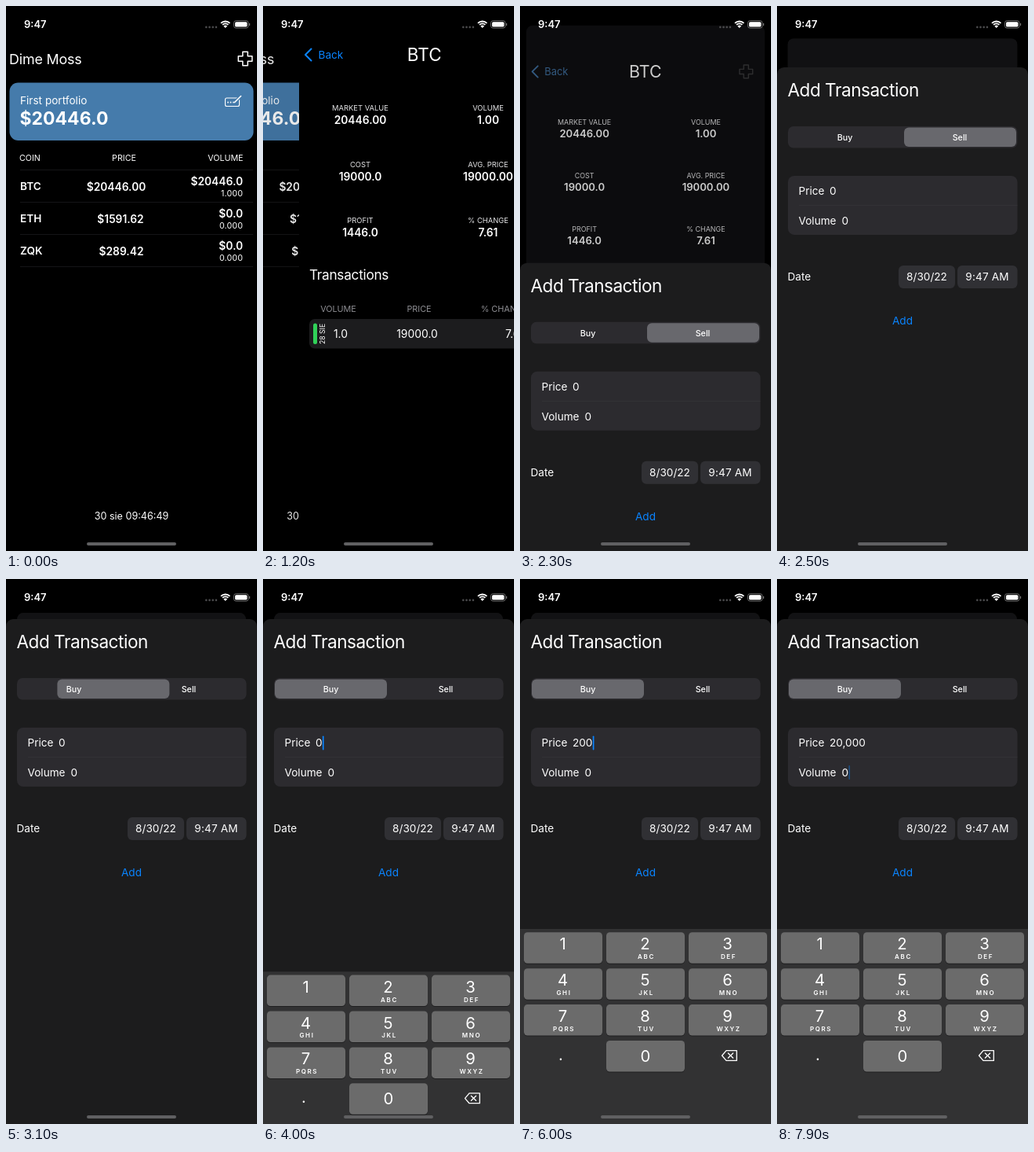
Write an HTML page with a canvas that moves like this. It is 320 by 693 pixels and loops after 8000 ms.

```html
<!DOCTYPE html>
<html lang="en">
<head>
<meta charset="utf-8">
<title>Portfolio</title>
<style>
  html, body { margin: 0; width: 100%; height: 100%; overflow: hidden; background: #000; }
  canvas { display: block; width: 320px; height: 693px; }
</style>
</head>
<body>
<canvas id="stage"></canvas>
<script>
const W = 320, H = 693, LOOP = 8000, STEP = 100;
const canvas = document.getElementById('stage');
const ctx = canvas.getContext('2d');
const dpr = window.devicePixelRatio || 1;
canvas.width = W * dpr;
canvas.height = H * dpr;

const BLUE = '#0a84ff', FIELD = '#2c2b2f', SHEET = '#1c1c1d';
const BODY = 13.6;

// Progress of a critically damped spring, from 0 to 1.
function spring(t, start) {
  const x = Math.max(0, t - start) / 1000 * 15.2;
  const p = 1 - (1 + x) * Math.exp(-x);
  return p > 0.998 ? 1 : p;
}

function box(x, y, w, h, r, fill) {
  ctx.beginPath();
  ctx.roundRect(x, y, w, h, r);
  ctx.fillStyle = fill;
  ctx.fill();
}

// Text with its capitals centred on y.
function text(s, x, y, size, { weight = 400, align = 'left', color = '#fff', track = 0 } = {}) {
  ctx.font = `${weight} ${size}px Inter, sans-serif`;
  ctx.letterSpacing = `${track * size}px`;
  ctx.textAlign = align;
  ctx.fillStyle = color;
  ctx.fillText(s, x, y + size * 0.364);
  return ctx.measureText(s).width;
}

const centered = (s, x, y, size, options) => text(s, x, y, size, { align: 'center', ...options });

function line(points, color, width, close = false) {
  ctx.beginPath();
  points.forEach(([x, y]) => ctx.lineTo(x, y));
  if (close) ctx.closePath();
  ctx.strokeStyle = color;
  ctx.lineWidth = width;
  ctx.lineJoin = ctx.lineCap = 'round';
  ctx.stroke();
}

function plusIcon(x, y, color) {
  const a = 3.2, b = 8.8;
  const arm = [[-a, -a], [-a, -b], [a, -b]];
  const points = [];
  for (let i = 0; i < 4; i++) {
    for (let [px, py] of arm) {
      for (let k = 0; k < i; k++) [px, py] = [-py, px];
      points.push([x + px, y + py]);
    }
  }
  line(points, color, 1.5, true);
}

function editIcon() {
  ctx.beginPath();
  ctx.roundRect(279.5, 117, 18, 10.5, 2);
  ctx.strokeStyle = '#fff';
  ctx.lineWidth = 1.1;
  ctx.stroke();
  line([[291, 123], [300, 114]], '#457bab', 4);
  line([[291.5, 122.5], [299.5, 114.5]], '#fff', 1.6);
  for (const x of [283, 286.5, 290]) box(x - 0.9, 121.6, 1.8, 1.8, 0.9, '#fff');
}

function statusBar() {
  text('9:47', 23, 23, 13, { weight: 600 });
  for (let i = 0; i < 4; i++) box(254 + i * 4.2, 25.6, 2.6, 2.6, 1.3, '#4a4a4c');
  ctx.strokeStyle = '#fff';
  ctx.lineCap = 'butt';
  ctx.lineWidth = 1.8;
  for (const r of [8.1, 5.2]) {
    ctx.beginPath();
    ctx.arc(279.7, 27.6, r, -Math.PI * 0.75, -Math.PI * 0.25);
    ctx.stroke();
  }
  ctx.beginPath();
  ctx.moveTo(279.7, 28);
  ctx.arc(279.7, 28, 3.4, -Math.PI * 0.75, -Math.PI * 0.25);
  ctx.fillStyle = '#fff';
  ctx.fill();
  ctx.beginPath();
  ctx.roundRect(290.5, 18.7, 18.4, 9.4, 2.8);
  ctx.strokeStyle = '#777';
  ctx.lineWidth = 0.9;
  ctx.stroke();
  box(292, 20.2, 15.4, 6.4, 1.6, '#fff');
  box(309.9, 21.8, 1.2, 3.2, 0.6, '#777');
}

const coins = [
  ['BTC', '$20446.00', 140.5, '$20446.0', '1.000'],
  ['ETH', '$1591.62', 146, '$0.0', '0.000'],
  ['ZQK', '$289.42', 147, '$0.0', '0.000']
];

function homePage() {
  box(0, 0, W, H, 0, '#000');
  text('Dime Moss', 4, 67, 17.9, { track: -0.01 });
  plusIcon(305, 67, '#fff');
  box(4.5, 97.5, 311, 73.5, 11, '#457bab');
  text('First portfolio', 18, 120, BODY);
  text('$20446.0', 17.5, 143, 23, { weight: 700 });
  editIcon();
  text('COIN', 17, 193, 10.7);
  centered('PRICE', 150.5, 193, 10.7);
  text('VOLUME', 302.5, 193, 10.7, { align: 'right' });
  box(18, 208, 297, 0.8, 0, '#1d1d1f');
  coins.forEach(([name, price, x, value, volume], i) => {
    const y = 229.5 + i * 41;
    text(name, 18, y, BODY, { weight: 600 });
    centered(price, x, y, 13.8, { weight: 600 });
    text(value, 302, y - 6.5, 13.8, { weight: 600, align: 'right' });
    text(volume, 302, y + 8.5, 10.7, { align: 'right', track: 0.01 });
    box(18, y + 19.7, 297, 0.8, 0, '#1d1d1f');
  });
  centered('30 sie 09:46:49', 160, 648, 12.6);
}

const stats = [
  ['MARKET VALUE', '20446.00', 'VOLUME', '1.00'],
  ['COST', '19000.0', 'AVG. PRICE', '19000.00'],
  ['PROFIT', '1446.0', '% CHANGE', '7.61']
];

function detailPage(fade, pressed) {
  box(0, 0, W, H, 0, '#000');
  if (fade) box(0, 0, W, H, 0, `rgba(28,28,30,${fade})`);
  const k = Math.min(1, fade * 2);
  const tint = `rgb(${10 + 53 * k},${132 - 21 * k},${255 - 96 * k})`;
  line([[15.5, 54.5], [8, 62], [15.5, 69.5]], tint, 2);
  text('Back', 24.5, 62, BODY, { color: tint });
  centered('BTC', 159.7, 62, 22.5);
  plusIcon(295, 62, pressed ? '#38383a' : '#fff');
  stats.forEach(([label1, value1, label2, value2], i) => {
    const y = 130 + i * 71.5;
    centered(label1, 78, y, 9.4, { color: '#e4e4e6' });
    centered(value1, 78, y + 15, 13.8, { weight: 600 });
    centered(label2, 241, y, 9.4, { color: '#e4e4e6' });
    centered(value2, 241, y + 15, 13.8, { weight: 600 });
  });
  text('Transactions', 13, 341.5, 17.2, { track: -0.015 });
  const grey = { color: '#8e8e93' };
  centered('VOLUME', 50, 385, 10.8, grey);
  centered('PRICE', 153, 385, 10.8, grey);
  centered('% CHANGE', 261.5, 385, 10.8, grey);
  box(13, 398, 294, 37.5, 7, '#1c1c1e');
  box(18, 403.5, 5, 26.5, 2.5, '#30d158');
  ctx.save();
  ctx.translate(30, 417);
  ctx.rotate(-Math.PI / 2);
  centered('28 SIE', 0, 0, 8.7);
  ctx.restore();
  centered('1.0', 53, 417, 13.9);
  centered('19000.0', 150.5, 417, 13.9);
  centered('7.61', 275, 417, 13.9);
  if (fade) box(0, 0, W, H, 0, `rgba(0,0,0,${fade * 0.35})`);
}

// Time of each edit, the price it leaves and the key that makes it.
const edits = [
  [3850, '0'],
  [4800, '', 'del'],
  [5200, '2', '2'],
  [5700, '20', '0'],
  [5900, '200', '0'],
  [6200, '2000', '0'],
  [6500, '20000', '0'],
  [7100, '20,000']
];

function caret(x, y, age) {
  const off = Math.min(1, Math.max(0, (age - 600) / 250));
  const on = Math.min(1, Math.max(0, (age - 1000) / 250));
  const alpha = 1 - off + on;
  if (alpha > 0) box(x + 0.3, y - 9, 1.7, 18, 0.8, `rgba(10,132,255,${alpha})`);
}

function sheet(t, top, edit) {
  ctx.save();
  ctx.translate(0, top - 51);
  box(0, 51, W, H, [9, 9, 0, 0], SHEET);
  text('Add Transaction', 13.5, 80, 22.6, { track: -0.022 });

  box(14, 126, 292.5, 27.5, 7, FIELD);
  box(162 - 147 * spring(t, 2952), 127.5, 143, 24.5, 6, '#68686d');
  centered('Buy', 86.5, 140, 10.7, { weight: 500 });
  centered('Sell', 233, 140, 10.7, { weight: 500 });

  box(14, 189, 292.5, 75, 8, FIELD);
  box(28, 226.3, 278.5, 0.7, 0, '#343437');
  text('Price', 27.5, 208.5, BODY);
  text('Volume', 27.5, 246, BODY);
  const priceEnd = 67 + text(edit ? edit[1] : '0', 67, 208.5, BODY);
  const volumeEnd = 82.5 + text('0', 82.5, 246, BODY);
  if (edit) {
    if (t < 7100) caret(priceEnd, 208.5, t - edit[0]);
    else caret(volumeEnd, 246, t - 7150);
  }

  text('Date', 13.5, 317.5, BODY);
  box(155, 303, 72, 29, 6, '#303034');
  box(230, 303, 76.5, 29, 6, '#303034');
  centered('8/30/22', 191, 317.5, BODY);
  centered('9:47 AM', 268, 317.5, BODY, { track: 0.01 });
  centered('Add', 160, 373.5, BODY, { color: BLUE });
  ctx.restore();
}

const letters = ['', 'ABC', 'DEF', 'GHI', 'JKL', 'MNO', 'PQRS', 'TUV', 'WXYZ'];

function key(x, y, pressed) {
  box(x, y + 1, 100, 39.5, 4.5, '#1f1f20');
  box(x, y, 100, 39.5, 4.5, pressed ? '#474748' : '#6b6b6b');
}

function deleteIcon(pressed) {
  const outline = [[257.5, 606], [263, 599.6], [276.3, 599.6], [276.3, 612.4], [263, 612.4]];
  line(outline, '#fff', 1.3, true);
  if (pressed) {
    ctx.fillStyle = '#fff';
    ctx.fill();
  }
  const mark = pressed ? '#323233' : '#fff';
  line([[265.4, 603], [271.6, 609]], mark, 1.3);
  line([[271.6, 603], [265.4, 609]], mark, 1.3);
}

function keypad(progress, pressed) {
  ctx.save();
  ctx.translate(0, 248 * (1 - progress));
  box(0, 445, W, H, 0, '#323233');
  letters.forEach((caption, i) => {
    const x = 5 + (i % 3) * 105, y = 449.3 + Math.floor(i / 3) * 45.9;
    const digit = String(i + 1);
    key(x, y, pressed === digit);
    centered(digit, x + 49.5, y + 14.7, 20.3);
    centered(caption, x + 51, y + 31, 8, { weight: 600, track: 0.2 });
  });
  key(110, 587, pressed === '0');
  centered('0', 160, 606.5, 20.3);
  centered('.', 52, 604.5, 20.3);
  deleteIcon(pressed === 'del');
  ctx.restore();
}

function render(t) {
  ctx.setTransform(dpr, 0, 0, dpr, 0, 0);
  box(0, 0, W, H, 0, '#000');

  const push = spring(t, 974), rise = spring(t, 2174);
  if (push < 1) {
    ctx.save();
    ctx.translate(-96 * push, 0);
    homePage();
    ctx.restore();
    if (push > 0) box(0, 0, W, H, 0, `rgba(0,0,0,${push * 0.1})`);
  }
  if (push > 0) {
    const scale = 1 - 0.0875 * rise;
    ctx.save();
    ctx.translate(160 * (1 - scale) + Math.round(W * (1 - push)), 43 * rise);
    ctx.scale(scale, scale);
    ctx.beginPath();
    ctx.roundRect(0, 0, W, H, 9 * Math.min(1, rise * 3));
    ctx.clip();
    detailPage(rise, t >= 2100);
    ctx.restore();
  }
  if (rise > 0) {
    const edit = edits.filter(([time]) => time <= t).pop();
    sheet(t, H - 642 * rise, edit);
    const typing = spring(t, 3811);
    if (typing > 0) keypad(typing, edit && t - edit[0] < 100 ? edit[2] : null);
  }
  statusBar();
  box(103, 682, 114, 4, 2, '#606062');
}

function frame() {
  const t = performance.now() % LOOP;
  render(Math.floor(t / STEP) * STEP);
  requestAnimationFrame(frame);
}
frame();
</script>
</body>
</html>
```
